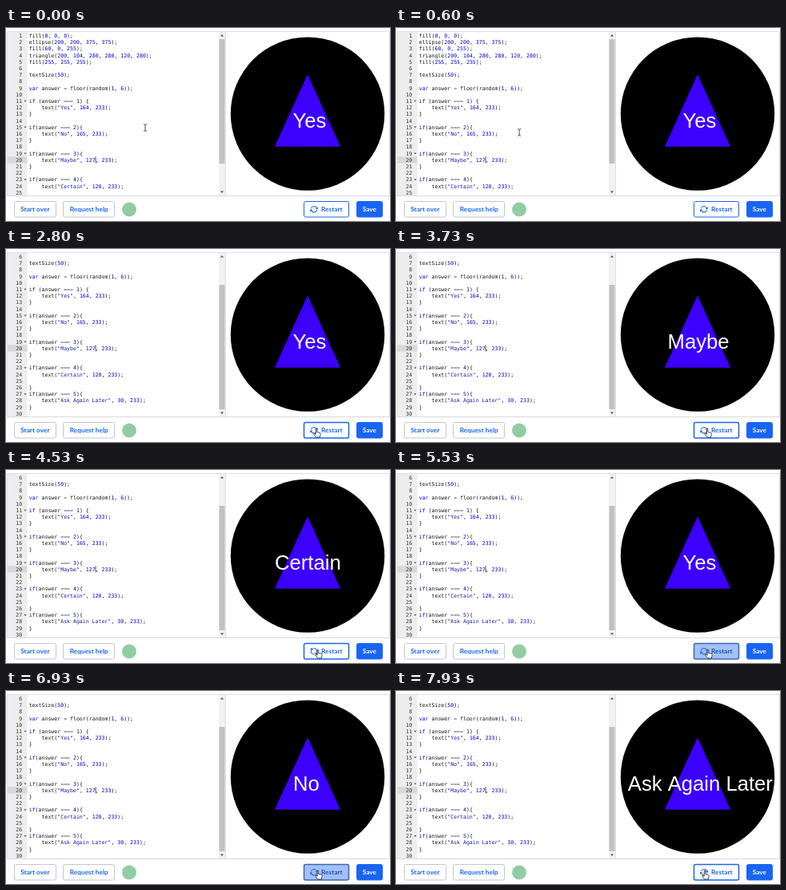
Recreate the animation shown at these times as an HTML page with a canvas. Size 480 by 242 pixels, loop 8000 ms.

```html
<!DOCTYPE html>
<html lang="en">
<head>
<meta charset="utf-8">
<title>Answer program</title>
<style>
html, body { margin: 0; width: 100%; height: 100%; overflow: hidden; background: #fff; }
canvas { display: block; width: 480px; height: 242px; }
</style>
</head>
<body>
<canvas id="stage" width="480" height="242"></canvas>
<script>
const ctx = document.getElementById('stage').getContext('2d');
const LOOP = 8000, BLUE = '#1865f2';
const LINE = 8.2, CHAR = 3.95, CODE_X = 28.7;
const MONO = '6.56px "DejaVu Sans Mono", monospace';

const code = `fill(0, 0, 0);
ellipse(200, 200, 375, 375);
fill(60, 0, 255);
triangle(200, 104, 280, 280, 120, 280);
fill(255, 255, 255);

textSize(50);

var answer = floor(random(1, 6));

if (answer === 1) {
    text("Yes", 164, 233);
}

if(answer === 2){
    text("No", 165, 233);
}

if(answer === 3){
    text("Maybe", 127, 233);
}

if(answer === 4){
    text("Certain", 120, 233);

}
if(answer === 5){
    text("Ask Again Later", 30, 233);
}
`.split('\n');

const answerX = { Yes: 164, No: 165, Maybe: 127, Certain: 120, 'Ask Again Later': 30 };

// Time of each button release and the answer it produces
const clicks = [
  [3130, 'Maybe'], [4430, 'Certain'], [5070, 'Yes'],
  [5600, 'No'], [7000, 'Maybe'], [7900, 'Ask Again Later']
];

// Pointer stops: time, x, y
const path = [
  [0, 174, 125], [300, 174, 125], [1400, 66, 157], [1800, 66, 157],
  [2600, 389, 231], [2900, 389, 231], [4400, 391, 231],
  [7000, 391, 231], [7800, 387, 231], [8000, 387, 231]
];

const clamp = v => Math.max(0, Math.min(1, v));
const ease = v => v * v * (3 - 2 * v);

function pointerAt(t) {
  const i = Math.max(1, path.findIndex(p => p[0] > t));
  const [t0, x0, y0] = path[i - 1], [t1, x1, y1] = path[i];
  const k = ease(clamp((t - t0) / (t1 - t0)));
  return [x0 + (x1 - x0) * k, y0 + (y1 - y0) * k];
}

function rect(x, y, w, h, color) {
  ctx.fillStyle = color;
  ctx.fillRect(x, y, w, h);
}

function polygon(points, color) {
  ctx.fillStyle = color;
  ctx.beginPath();
  points.forEach(([x, y]) => ctx.lineTo(x, y));
  ctx.closePath();
  ctx.fill();
}

function disc(x, y, r, color) {
  ctx.fillStyle = color;
  ctx.beginPath();
  ctx.arc(x, y, r, 0, Math.PI * 2);
  ctx.fill();
}

function label(text, x, y, color, font, align = 'left') {
  ctx.font = font;
  ctx.fillStyle = color;
  ctx.textAlign = align;
  ctx.fillText(text, x, y);
}

function tokenColor(token) {
  if (/^"/.test(token)) return '#1a1aa6';
  if (/^\d/.test(token)) return '#0000cd';
  if (/^(if|var)$/.test(token)) return '#0000ff';
  if (/^=/.test(token)) return '#566270';
  return '#151515';
}

function drawCode(scroll) {
  ctx.save();
  ctx.beginPath();
  ctx.rect(2, 5, 264, 205);
  ctx.clip();
  rect(2, 5, 24.5, 205, '#ededed');
  code.forEach((text, i) => {
    const y = 5.5 + (i - scroll) * LINE, base = y + 6.4;
    if (i === 19) {
      rect(2, y, 24.5, LINE, '#d8d8d8');
      rect(CODE_X + 21 * CHAR, y, 0.8, LINE, '#222');
    }
    label(i + 1, 20.2, base, '#333', MONO, 'right');
    if (text.startsWith('if')) {
      polygon([[22.4, y + 3.3], [25.6, y + 3.3], [24, y + 5.3]], '#555');
    }
    for (const m of text.matchAll(/"[^"]*"|\w+|=+|[^\s\w"=]+/g)) {
      label(m[0], CODE_X + m.index * CHAR, base, tokenColor(m[0]), MONO);
    }
  });
  ctx.restore();
}

function drawScrollbar(scroll) {
  rect(266, 5, 8, 205, '#f1f1f1');
  rect(266.5, 14 + scroll * 6.2, 7, 156, '#c1c1c1');
  polygon([[268, 10.5], [272, 10.5], [270, 8]], '#505050');
  polygon([[268, 204.5], [272, 204.5], [270, 207]], '#505050');
}

function drawOutput(answer) {
  ctx.save();
  ctx.translate(274.4, 5);
  ctx.scale(0.513, 0.513);
  disc(200, 200, 187.5, '#000');
  polygon([[200, 104], [280, 280], [120, 280]], '#3c00ff');
  label(answer, answerX[answer], 233, '#fff', '50px "Liberation Sans", Arial, sans-serif');
  ctx.restore();
}

function button(text, x, w, textX, { fill = '#fff', border, width = 1, color = BLUE }) {
  ctx.beginPath();
  ctx.roundRect(x + 0.5, 217.5, w - 1, 19.5, 2);
  ctx.fillStyle = fill;
  ctx.fill();
  ctx.strokeStyle = border;
  ctx.lineWidth = width;
  ctx.stroke();
  label(text, textX, 230, color, 'bold 8.3px Lato, sans-serif');
}

function restartIcon(angle) {
  ctx.save();
  ctx.translate(385, 227.3);
  ctx.rotate(angle);
  ctx.strokeStyle = BLUE;
  ctx.lineWidth = 1.1;
  for (let half = 0; half < 2; half++) {
    ctx.beginPath();
    ctx.arc(0, 0, 3.7, Math.PI * 1.08, Math.PI * 1.82);
    ctx.stroke();
    polygon([[4.8, -3.4], [4.8, 0], [1.6, -0.4]], BLUE);
    ctx.rotate(Math.PI);
  }
  ctx.restore();
}

function drawToolbar(t, hover, pressed, spin) {
  rect(1, 210, 478, 1, '#d9dade');
  button('Start over', 10, 53, 18.2, { border: '#c4c6cb' });
  button('Request help', 71, 65, 79.8, { border: '#c4c6cb' });
  disc(154, 227.5, 9, '#91cca2');
  button('Restart', 372, 57, 394, {
    fill: pressed ? '#a3c1f7' : '#fff',
    border: pressed ? '#3a68b8' : BLUE,
    width: hover ? 1.5 : 1,
    color: pressed ? '#1b50b3' : BLUE
  });
  restartIcon(spin);
  button('Save', 438, 33, 445.7, { fill: BLUE, border: BLUE, color: '#fff' });
}

function drawPointer(x, y, hover) {
  ctx.save();
  ctx.translate(x, y);
  ctx.lineWidth = 0.8;
  ctx.strokeStyle = '#222';
  let shape;
  if (hover) {
    shape = 'M-1.8-5C-1.8-6-.3-6-.3-5V-1.4L3.2-.7Q4.2-.4 4.2.6L3.4 5H-1.4L-4.3 1.2Q-4.2 0-3.1.4L-1.8 1.4Z';
  } else if (x < 266 && y < 210) {
    shape = 'M-2-4.3Q0-4.3 0-3.3Q0-4.3 2-4.3M0-3.3V3.3M-2 4.3Q0 4.3 0 3.3Q0 4.3 2 4.3';
  } else {
    shape = 'M0-4V4L1.9 2.3L3.2 5L4.3 4.5L3.1 1.9H5.7Z';
  }
  const outline = new Path2D(shape);
  if (hover || x >= 266 || y >= 210) {
    ctx.fillStyle = '#fff';
    ctx.fill(outline);
  }
  ctx.stroke(outline);
  ctx.restore();
}

function draw(t) {
  const scroll = 5 * ease(clamp((t - 1570) / 160));
  const [x, y] = pointerAt(t);
  const hover = x > 372 && x < 429 && y > 217;
  const pressed = clicks.some(([time]) => t >= time - 130 && t < time);
  const last = clicks.filter(([time]) => time <= t).pop();
  const spin = last ? Math.PI * ease(clamp((t - last[0]) / 250)) : 0;

  rect(0, 0, 480, 242, '#fff');
  drawCode(scroll);
  drawScrollbar(scroll);
  drawOutput(last ? last[1] : 'Yes');
  rect(1, 4, 478, 1, '#dedfe2');
  rect(1, 4, 1, 207, '#dedfe2');
  rect(274, 4, 1, 207, '#dedfe2');
  rect(479, 4, 1, 207, '#dedfe2');
  drawToolbar(t, hover, pressed, spin);
  drawPointer(x, y, hover);
}

const start = performance.now();
function tick() {
  draw((performance.now() - start) % LOOP);
  requestAnimationFrame(tick);
}
tick();
</script>
</body>
</html>
```
